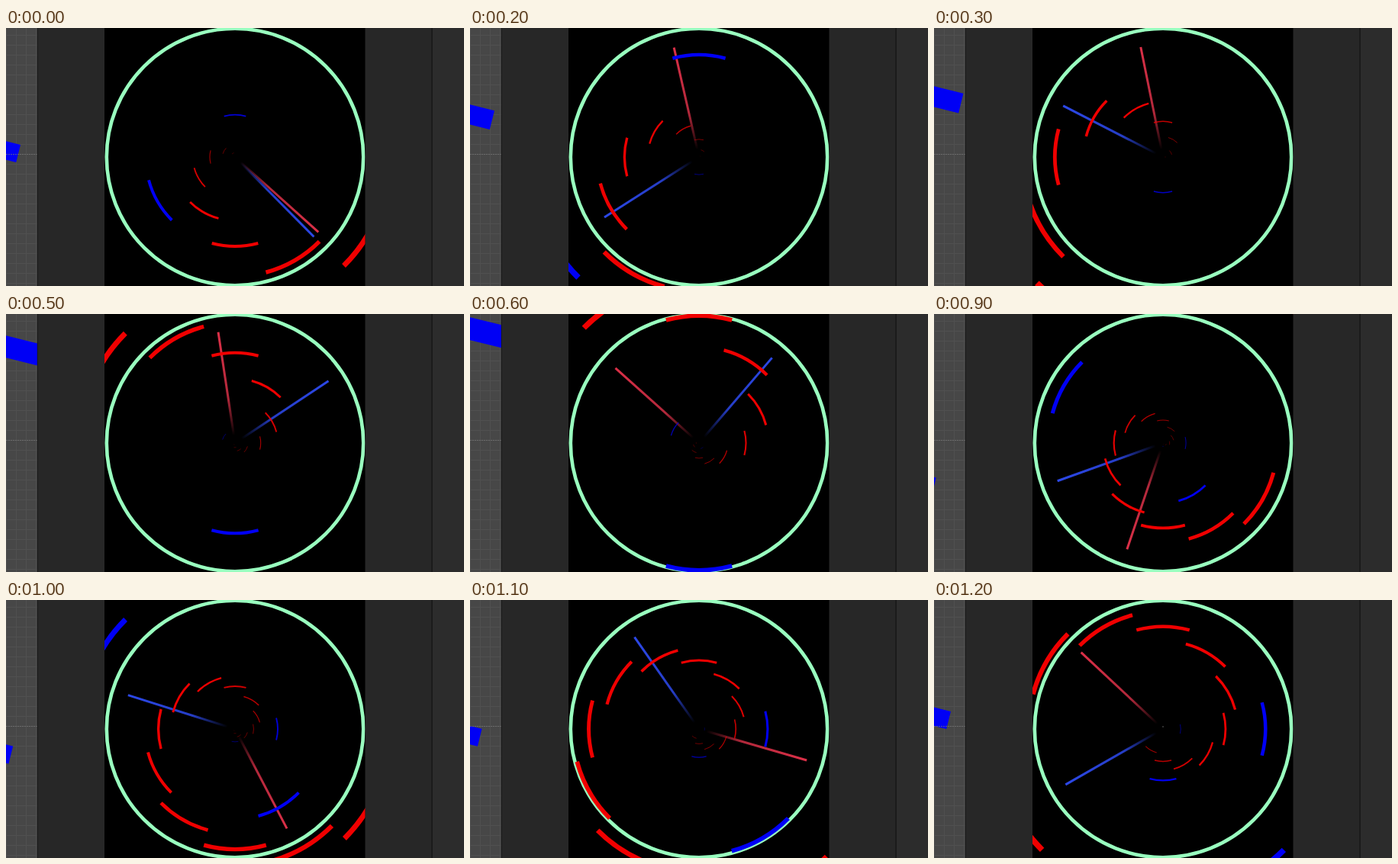
Recreate the animation shown at these times as an HTML page. Size 600x338 px, loop 1300 ms.

```html
<!DOCTYPE html>
<html lang="en">
<head>
<meta charset="utf-8">
<title>Rhythm tunnel</title>
<style>
  html, body { margin: 0; width: 100%; height: 100%; overflow: hidden; background: #272727; }
  svg { display: block; width: 100vw; height: 100vh; }
</style>
</head>
<body>
<svg viewBox="0 0 600 338">
  <defs>
    <clipPath id="view"><rect x="129" width="341.5" height="338"/></clipPath>
    <clipPath id="side"><rect width="41" height="338"/></clipPath>
    <pattern id="grid" width="13" height="13" patternUnits="userSpaceOnUse" y="9">
      <path d="M0.5 0V13M0 0.5H13" stroke="#505050" fill="none"/>
    </pattern>
    <linearGradient id="red" gradientUnits="userSpaceOnUse" x1="0" y1="0" x2="147" y2="0">
      <stop offset=".07" stop-color="#dc3048" stop-opacity="0"/>
      <stop offset=".4" stop-color="#d02f45" stop-opacity=".85"/>
      <stop offset="1" stop-color="#dc3048"/>
    </linearGradient>
    <linearGradient id="blue" gradientUnits="userSpaceOnUse" x1="0" y1="0" x2="147" y2="0">
      <stop offset=".07" stop-color="#2c48e8" stop-opacity="0"/>
      <stop offset=".4" stop-color="#2c48e8" stop-opacity=".85"/>
      <stop offset="1" stop-color="#2c48e8"/>
    </linearGradient>
  </defs>

  <rect width="600" height="338" fill="#272727"/>
  <rect x="559" width="41" height="338" fill="#2c2c2c"/>
  <path d="M558 0V338" stroke="#191919" stroke-width="1.5"/>
  <g clip-path="url(#side)">
    <rect width="41" height="338" fill="#474747"/>
    <rect width="41" height="338" fill="url(#grid)"/>
    <g id="blocks" fill="#0000f5"></g>
    <path d="M0 165.5H41" stroke="#777" stroke-dasharray="2 1" opacity=".7"/>
  </g>
  <path d="M41.3 0V338" stroke="#1b1b1b"/>

  <g clip-path="url(#view)">
    <rect x="129" width="342" height="338"/>
    <g transform="translate(300 169)" fill="none">
      <circle r="168.2" stroke="#99ffbf" stroke-width="4.6"/>
      <path id="redHand" d="M0 0L147 .01" stroke="url(#red)" stroke-width="3"/>
      <path id="blueHand" d="M0 0L147 .01" stroke="url(#blue)" stroke-width="3"/>
      <g id="arcs"></g>
      <rect id="dot" x="-.5" y="-3.5" width="1" height="1" fill="#bbb"/>
    </g>
  </g>
</svg>
<script>
const LOOP = 1300, STEP = 100, SPEED = 0.845;
const byId = id => document.getElementById(id);

function add(parent, tag, attrs) {
  const el = document.createElementNS("http://www.w3.org/2000/svg", tag);
  for (const key in attrs) el.setAttribute(key, attrs[key]);
  return byId(parent).appendChild(el);
}

// Key positions: [step, beat, red hand angle, blue hand angle]
const keys = [
  [0, 16.8, 42, 45.3],
  [2, 21.69, -102.9, 147.5],
  [5, 28.87, -98.6, 326.4],
  [7, 33.69, -177.7, 294.8],
  [9, 38.49, -251.3, 160.2],
  [11, 43.22, -343.8, 234.9],
  [12, 45.71, -496.9, 150.3]
];

function sample(step) {
  const i = Math.max(1, keys.findIndex(k => k[0] >= step));
  const a = keys[i - 1], b = keys[i];
  const f = (step - a[0]) / (b[0] - a[0]);
  return a.map((v, j) => v + (b[j] - v) * f);
}

// Red notes turn 30 degrees each; their spacing halves after beat 24.
const notes = [];
for (let i = 0; i < 28; i++)
  notes.push({ beat: i <= 12 ? 2 * i : 12 + i, angle: 30 * (i + 1), color: "#f00000" });
for (const [beat, angle] of [[4, 150], [8, 270], [16, 90], [24, 210], [28, 60], [32, 0], [36, 90], [40, 0]])
  notes.push({ beat, angle, color: "#0000f5" });

const halfArc = Math.PI / 12;
for (const note of notes) {
  note.el = add("arcs", "path", { stroke: note.color });
}

function drawNote(note, beat) {
  const u = (beat - note.beat) * SPEED;
  const r = u * u;
  const shown = u > 1.2 && r < 270;
  note.el.style.display = shown ? "" : "none";
  if (!shown) return;
  const mid = note.angle * Math.PI / 180;
  const point = a => `${(r * Math.cos(a)).toFixed(2)} ${(r * Math.sin(a)).toFixed(2)}`;
  note.el.setAttribute("d", `M${point(mid - halfArc)}A${r} ${r} 0 0 1 ${point(mid + halfArc)}`);
  note.el.setAttribute("stroke-width", Math.max(0.9, r * 0.034));
  note.el.setAttribute("opacity", Math.min(1, u / 8.5));
}

// Tilted blocks sliding up the side strip, placed by their top right corner
const blocks = [
  { x: 19, y: 153, vx: 6.5, vy: -22.4, start: 0, grow: 0.9 },
  { x: 22, y: 146, vx: 6.4, vy: -22.8, start: 12, grow: 0 }
];
for (const block of blocks) block.el = add("blocks", "rect", { x: -120, width: 120 });

function render(ms) {
  const step = Math.floor((ms % LOOP) / STEP);
  const [, beat, red, blue] = sample(step);
  for (const note of notes) drawNote(note, beat);
  byId("redHand").setAttribute("transform", `rotate(${red})`);
  byId("blueHand").setAttribute("transform", `rotate(${blue})`);
  byId("dot").style.display = beat > 45 ? "" : "none";
  for (const b of blocks) {
    const n = step - b.start;
    b.el.setAttribute("height", 23.7 + b.grow * n);
    b.el.setAttribute("transform", `translate(${b.x + b.vx * n} ${b.y + b.vy * n}) rotate(14)`);
  }
}

let origin;
function tick(now) {
  origin ??= now;
  render(now - origin);
  requestAnimationFrame(tick);
}
render(0);
requestAnimationFrame(tick);
</script>
</body>
</html>
```
